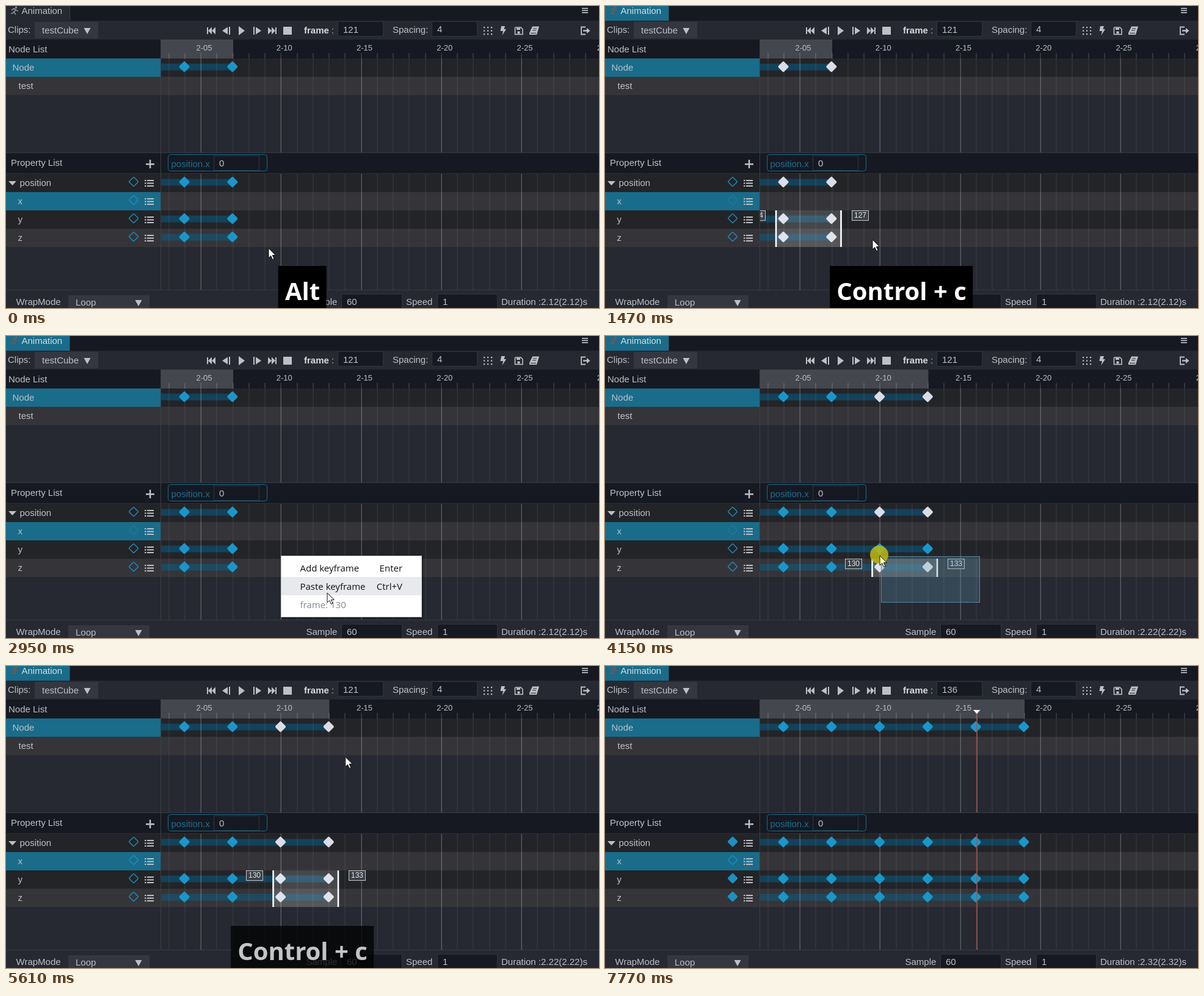
An HTML page with a canvas for the animation above (8000 ms loop, 971 px wide and 495 px high).

```html
<!DOCTYPE html>
<html lang="en">
<head>
<meta charset="utf-8">
<title>Animation editor</title>
<style>
html, body { margin: 0; width: 100%; height: 100%; overflow: hidden; background: #262931; }
canvas { display: block; }
</style>
</head>
<body>
<canvas id="stage" width="971" height="495"></canvas>
<script>
const ctx = document.getElementById('stage').getContext('2d');
const LOOP = 8000;
const SANS = '"Liberation Sans", Arial, sans-serif';
const HUMAN = '"Open Sans", "Noto Sans", sans-serif';
const C = {
  dark: '#161922', panel: '#262931', rowA: '#232427', rowB: '#353539',
  accent: '#196c8a', key: '#1b96c8', picked: '#dadde8', text: '#bdc0c6', line: '#363a43'
};
const ROW_Y = { position: 288.5, x: 318.5, y: 348.5, z: 378.5 };

// time, x, y of the pointer tip
const PATH = [
  [0, 430, 397], [150, 430, 397], [780, 268, 345], [1010, 268, 345],
  [1400, 438, 383], [1500, 438, 383], [1960, 450, 360], [2570, 450, 360],
  [2720, 500, 390], [2900, 504, 393], [2950, 526, 421], [3300, 526, 421],
  [3880, 612, 437], [3940, 612, 437], [4150, 450, 360], [4450, 438, 335],
  [5070, 438, 335], [5840, 606, 70], [5920, 602, 63], [7460, 602, 63], [7770, 985, 300]
];
const DRAGS = [
  { from: 150, to: 860, clear: 2170, x: 430, y: 397 },
  { from: 3940, to: 4610, clear: 6070, x: 610, y: 436 }
];
const CLICKS = [[3120, 3200], [6070, 6150]];
const CAPTIONS = [
  { text: 'Alt', from: 0, to: 600, width: 79 },
  { text: 'Control + c', from: 1090, to: 1930, width: 234 },
  { text: 'Control + c', from: 4840, to: 5800, width: 234 },
  { text: 'Control + v', from: 6450, to: 7700, width: 238 }
];

const frameX = f => 319 + (f - 5) * 26.25;
const keyX = f => frameX(f) - 0.7;
const within = (t, a, b) => t >= a && t < b;

function rect(x, y, w, h, fill) {
  ctx.fillStyle = fill;
  ctx.fillRect(x, y, w, h);
}
function outline(x, y, w, h, stroke) {
  ctx.strokeStyle = stroke;
  ctx.lineWidth = 1;
  ctx.strokeRect(x + 0.5, y + 0.5, w - 1, h - 1);
}
function text(s, x, y, { color = C.text, font = '15px ' + SANS, align = 'left' } = {}) {
  ctx.fillStyle = color;
  ctx.font = font;
  ctx.textAlign = align;
  ctx.fillText(s, x, y);
}
function poly(points, fill) {
  ctx.beginPath();
  points.forEach(([x, y]) => ctx.lineTo(x, y));
  ctx.closePath();
  ctx.fillStyle = fill;
  ctx.fill();
}
function stroke(points, color, width) {
  ctx.beginPath();
  points.forEach(([x, y]) => ctx.lineTo(x, y));
  ctx.strokeStyle = color;
  ctx.lineWidth = width;
  ctx.stroke();
}
function diamond(x, y, side, color, filled = true) {
  ctx.save();
  ctx.translate(x, y);
  ctx.rotate(Math.PI / 4);
  ctx.beginPath();
  ctx.roundRect(-side / 2, -side / 2, side, side, filled ? 2 : 1);
  ctx.fillStyle = ctx.strokeStyle = color;
  ctx.lineWidth = 1.3;
  if (filled) ctx.fill(); else ctx.stroke();
  ctx.restore();
}
function field(x, y, w, h, value, baseline) {
  rect(x, y, w, h, C.dark);
  outline(x, y, w, h, '#30343d');
  text(value, x + 9, baseline);
}
function dropdown(x, y, w, h, value, baseline, arrowX) {
  rect(x, y, w, h, '#343740');
  text(value, x + 12, baseline);
  poly([[arrowX - 5.5, baseline - 9], [arrowX + 5.5, baseline - 9], [arrowX, baseline + 1]], C.text);
}

function pointerAt(t) {
  const i = PATH.findIndex(p => p[0] > t);
  if (i < 0) return { x: 985, y: 300 };
  const [t0, x0, y0] = PATH[i - 1], [t1, x1, y1] = PATH[i];
  const k = (t - t0) / (t1 - t0);
  return { x: x0 + (x1 - x0) * k, y: y0 + (y1 - y0) * k };
}
function dragBox(drag, t) {
  const p = pointerAt(Math.min(t, drag.to));
  return { x: p.x + 2, y: p.y + 1, w: drag.x + 2 - p.x, h: drag.y - p.y };
}

function stateAt(t) {
  const keys = [4, 7];
  if (t >= 3120) keys.push(10, 13);
  if (t >= 6700) keys.push(16, 19);
  const drag = DRAGS.find(d => within(t, d.from, d.clear));
  let frames = [], rows = [];
  if (drag) {
    const b = dragBox(drag, t);
    frames = keys.filter(f => keyX(f) > b.x - 6 && keyX(f) < b.x + b.w);
    rows = ['y', 'z'].filter(r => ROW_Y[r] > b.y && ROW_Y[r] < b.y + b.h);
    if (!frames.length || !rows.length) frames = rows = [];
  }
  return {
    t, keys, frames, rows, pointer: pointerAt(t),
    dragging: drag && t < drag.to ? drag : null,
    pressed: DRAGS.some(d => within(t, d.from, d.to)) || CLICKS.some(c => within(t, ...c)),
    playhead: t >= 6070, onKey: t >= 6700, active: t >= 150
  };
}

function drawTopBars(s) {
  rect(0, 0, 971, 24, C.dark);
  rect(0, 0, 104, 24, s.active ? C.accent : C.panel);
  rect(104, 0, 1, 24, C.line);
  const runner = s.active ? '#7b5651' : '#8a8d94';
  stroke([[9, 7], [13, 4], [16, 6], [13, 10], [16, 14]], runner, 1.8);
  stroke([[13, 9], [11, 12], [8, 12]], runner, 1.6);
  stroke([[16, 7], [20, 8]], runner, 1.5);
  rect(15, 1, 3, 3, runner);
  text('Animation', 25.5, 13, { color: s.active ? '#d5dce0' : C.text });
  for (let i = 0; i < 3; i++) rect(943, 3 + i * 3.5, 10, 1.7, C.text);

  rect(0, 24, 971, 31, C.panel);
  text('Clips:', 3, 44);
  dropdown(47, 26, 104, 27, 'testCube', 45, 133);
  drawTransport();
  text('frame', 488, 45, { color: '#d8dade', font: 'bold 15px ' + SANS });
  text(':', 533, 45);
  field(543, 25, 75, 25, s.playhead ? '136' : '121', 44);
  text('Spacing:', 633, 44);
  field(697, 25, 75, 25, '4', 43);
  drawToolIcons();
}

function drawTransport() {
  const tri = (x, dir, w = 7, h = 6) => poly([[x, 40.5 - h], [x + dir * w, 40.5], [x, 40.5 + h]], C.text);
  rect(329, 35, 2, 11, C.text);
  tri(337, -1, 6); tri(343, -1, 6);
  tri(363, -1, 9); rect(365, 34, 2, 13, C.text);
  tri(381, 1, 10, 7.5);
  rect(405, 34, 2, 13, C.text);
  tri(409, 1, 9);
  tri(429, 1, 6); tri(435, 1, 6);
  rect(441, 35, 2, 11, C.text);
  rect(454, 34, 14, 13, C.text);
}

function drawToolIcons() {
  for (let i = 0; i < 9; i++) rect(782 + i % 3 * 6, 34 + Math.floor(i / 3) * 5.5, 2.2, 2.2, C.text);
  poly([[811, 33], [817, 33], [815.5, 38], [819, 38], [812.5, 48], [814, 41], [809.5, 41]], C.text);
  stroke([[834, 35], [843, 35], [846, 38], [846, 46.5], [833.5, 46.5], [833.5, 35]], C.text, 1.6);
  rect(836, 36, 6, 3, C.text);
  rect(837.5, 41.5, 4, 4, C.text);
  poly([[862, 33.5], [873, 33.5], [869, 47], [857, 47], [857, 44]], C.text);
  stroke([[863, 37], [869, 37]], C.panel, 1);
  stroke([[862, 40], [868, 40]], C.panel, 1);
  stroke([[859, 44.5], [868, 44.5]], C.panel, 1);
  stroke([[949, 34.5], [942, 34.5], [942, 46.5], [949, 46.5]], C.text, 1.8);
  rect(945, 39.3, 7, 2.4, C.text);
  poly([[951, 36], [956.5, 40.5], [951, 45]], C.text);
}

function drawPanels(s) {
  rect(0, 55, 971, 440, C.panel);
  rect(0, 55, 971, 31, C.dark);
  rect(254, 55, frameX(s.keys.at(-1)) + 0.5 - 254, 31, '#45474f');
  rect(0, 86, 253, 30, C.accent);
  rect(254, 86, 717, 30, C.rowA);
  rect(0, 116, 971, 30, C.rowB);
  rect(0, 240, 971, 35, C.dark);
  rect(0, 240, 971, 1, C.line);
  [C.rowA, C.rowB, C.rowA, C.rowB].forEach((fill, i) => rect(0, 275 + i * 30, 971, 30, fill));
  rect(0, 305, 253, 30, C.accent);
  rect(0, 274, 971, 1, '#2b2e36');

  text('Node List', 4, 76);
  text('Node', 10.5, 106);
  text('test', 20.5, 136);
  text('Property List', 8, 262);
  rect(229, 258, 14, 2.5, C.text);
  rect(234.8, 252, 2.5, 14, C.text);
  poly([[4, 287], [17, 287], [10.5, 294]], C.text);
  Object.entries(ROW_Y).forEach(([name, y]) => {
    text(name, name === 'position' ? 22.5 : 19.5, y + 6.5);
    const dim = name === 'x' && within(s.t, 1010, 4700);
    const filled = s.onKey && name !== 'x';
    diamond(209, y - 0.5, filled ? 12.5 : 11, dim ? '#227a9c' : '#1c90c2', filled);
    for (let i = 0; i < 3; i++) {
      rect(227, y - 3.5 + i * 4.5, 2.5, 2, C.text);
      rect(231, y - 3.5 + i * 4.5, 11, 2, C.text);
    }
  });

  ctx.beginPath();
  ctx.roundRect(265.5, 243.5, 162, 27, 4);
  ctx.strokeStyle = C.accent;
  ctx.lineWidth = 1;
  ctx.stroke();
  text('position.x', 270.5, 264, { color: '#1d6f90' });
  field(340, 245, 75, 25, '0', 263);
}

function drawTimeline(s) {
  const last = keyX(s.keys.at(-1));
  [99.5, ROW_Y.position, ROW_Y.y, ROW_Y.z].forEach(y =>
    rect(254, y - 5, last - 254, 11, y === ROW_Y.z ? '#1d4a61' : '#13425b'));

  for (let f = 3; f <= 30; f++) {
    const x = Math.round(frameX(f)) - 0.5, major = f % 5 === 0;
    const color = major ? 'rgba(255,255,255,.23)' : 'rgba(255,255,255,.1)';
    rect(x, 77, 1, 9, 'rgba(255,255,255,.25)');
    rect(x, 86, major ? 1.5 : 1, 154, color);
    rect(x, 275, major ? 1.5 : 1, 190, color);
    if (major) text('2-' + String(f).padStart(2, '0'), frameX(f) - 7.5, 73, { font: '13px ' + SANS });
  }
  rect(253, 55, 1, 410, '#3b3e45');

  for (const f of s.keys) {
    const picked = s.frames.includes(f);
    const draw = (y, on) => diamond(keyX(f), y, 13.2, on ? C.picked : C.key);
    draw(99.5, picked);
    draw(ROW_Y.position, picked);
    for (const r of ['y', 'z']) draw(ROW_Y[r], picked && s.rows.includes(r));
  }
  if (s.frames.length) drawSelection(s);
  if (s.playhead) {
    rect(608.3, 77, 1.6, 163, '#a65354');
    rect(608.3, 275, 1.6, 190, '#a65354');
    poly([[603, 72], [614.5, 72], [608.8, 78.5]], '#fff');
  }
}

function drawSelection(s) {
  const first = s.frames[0], last = s.frames.at(-1);
  const left = keyX(first) - 12, right = keyX(last) + 15.7;
  const top = s.rows.includes('y') ? 335 : 365;
  const height = s.rows.length * 30;
  rect(left, top, right - left, height, 'rgba(255,255,255,.16)');
  ctx.save();
  ctx.beginPath();
  ctx.rect(254, 86, 717, 379);
  ctx.clip();
  for (const x of [left, right]) rect(x - 1.3, top, 2.6, height, '#fff');
  [[left - 45, first], [right + 17, last]].forEach(([x, f]) => {
    x = Math.round(x);
    rect(x, top, 28, 17, '#3c4148');
    outline(x, top, 28, 17, '#c2c5c9');
    text(120 + f, x + 14, top + 12, { color: '#e6e8ea', font: '12px ' + SANS, align: 'center' });
  });
  ctx.restore();
}

function drawFooter(s) {
  rect(0, 465, 971, 30, C.panel);
  rect(0, 465, 971, 1, C.line);
  text('WrapMode', 16.5, 490);
  dropdown(102, 474, 133, 21, 'Loop', 491, 217);
  text('Sample', 491.5, 490);
  field(549, 472, 100, 25, '60', 490);
  text('Speed', 655, 490);
  field(706, 472, 99, 25, '1', 490);
  const d = ['2.12', '2.22', '2.32'][s.keys.length / 2 - 1];
  text(`Duration :${d}(${d})s`, 811, 490);
}

function drawMenu(s) {
  if (!within(s.t, 2220, 3180)) return;
  ctx.save();
  ctx.shadowColor = 'rgba(0,0,0,.5)';
  ctx.shadowBlur = 4;
  ctx.shadowOffsetX = ctx.shadowOffsetY = 1;
  rect(450, 360, 231, 101, '#fff');
  ctx.restore();
  outline(450, 360, 231, 101, '#c9c9cc');
  const hover = Math.floor((s.pointer.y - 365) / 30);
  if (within(hover, 0, 2)) rect(451, 365 + hover * 30, 229, 30, '#e8e9ed');
  const font = '15px ' + HUMAN;
  [['Add keyframe', 'Enter'], ['Paste keyframe', 'Ctrl+V'], ['frame: 130', '']].forEach(([name, hint], i) => {
    const color = i === 2 ? '#85878b' : '#111';
    text(name, 481.5, 386 + i * 30, { color, font });
    text(hint, 649, 386 + i * 30, { color, font, align: 'right' });
  });
}

function drawPointer(s) {
  const { x, y } = s.pointer;
  if (s.dragging) {
    const b = dragBox(s.dragging, s.t);
    rect(b.x, b.y, b.w, b.h, 'rgba(90,150,180,.27)');
    outline(b.x, b.y, b.w, b.h, '#5589a5');
  }
  if (s.pressed) {
    ctx.beginPath();
    ctx.arc(x - 1, y - 1.5, 15, 0, Math.PI * 2);
    ctx.fillStyle = 'rgba(190,185,20,.85)';
    ctx.fill();
  }
  const shape = within(s.t, 4610, 5070)
    ? [[-10, 0], [-5, -5], [-5, -1.5], [5, -1.5], [5, -5], [10, 0], [5, 5], [5, 1.5], [-5, 1.5], [-5, 5]]
    : [[0, 0], [0, 16], [3.7, 12.5], [6.5, 18.5], [9, 17.3], [6.3, 11.6], [11.3, 11.4]];
  const points = shape.map(([dx, dy]) => [x + dx, y + dy]);
  poly(points, s.dragging ? '#ffffa8' : '#fff');
  stroke([...points, points[0]], '#111', 1);
}

function drawCaption(t) {
  const c = CAPTIONS.find(c => within(t, c.from, c.to));
  if (!c) return;
  ctx.globalAlpha = Math.min(1, (c.to - t) / 250);
  rect(485.2 - c.width / 2, 426, c.width, 69, '#000');
  text(c.text, 485.5, 482, { color: '#fff', font: 'bold 40px ' + HUMAN, align: 'center' });
  ctx.globalAlpha = 1;
}

let start;
function tick(now) {
  start ??= now;
  const s = stateAt((now - start) % LOOP);
  drawTopBars(s);
  drawPanels(s);
  drawTimeline(s);
  drawFooter(s);
  drawMenu(s);
  drawCaption(s.t);
  drawPointer(s);
  requestAnimationFrame(tick);
}
requestAnimationFrame(tick);
</script>
</body>
</html>
```
